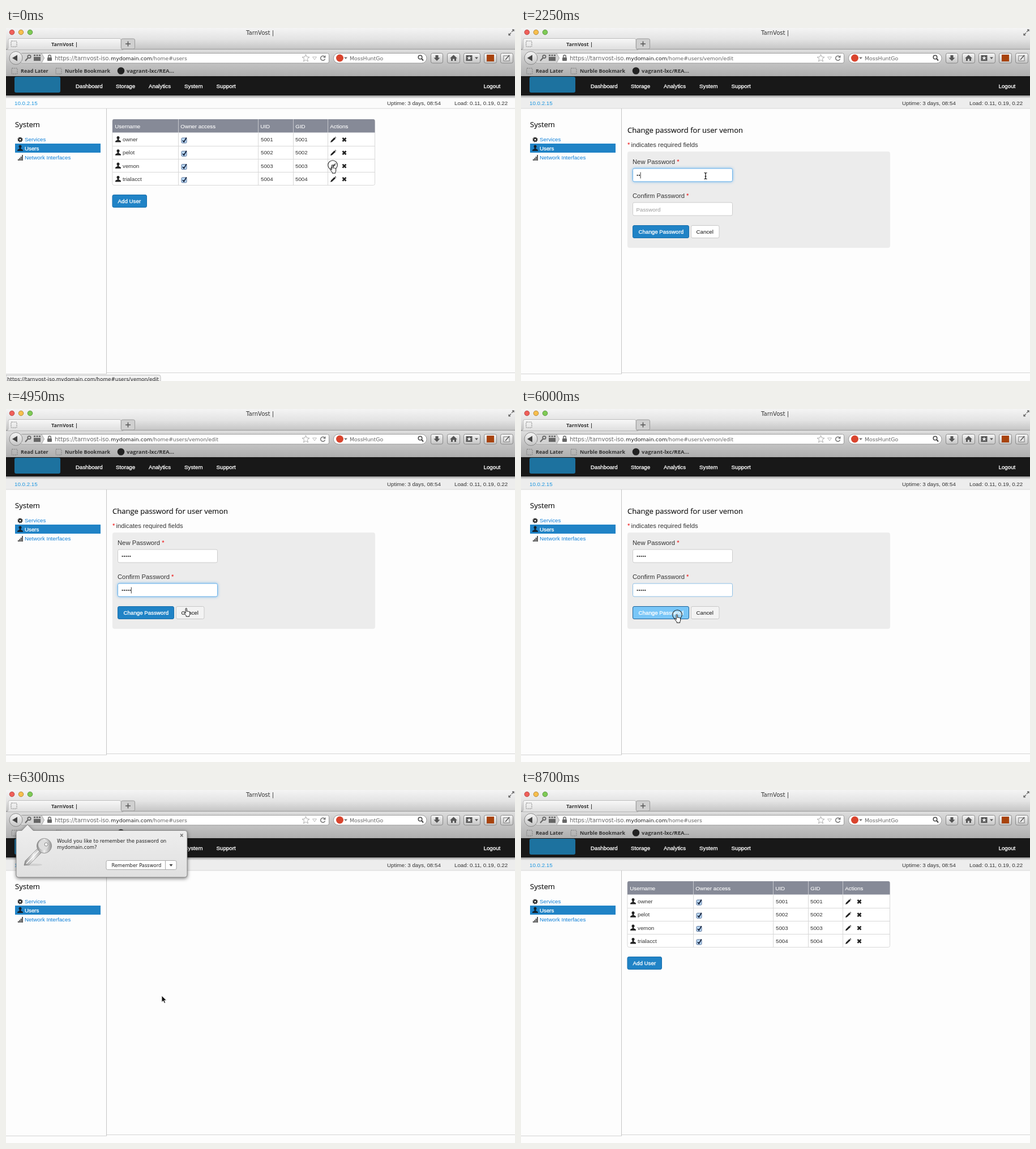
An HTML page that plays this animation: 899 px wide and 623 px high, repeating every 9430 ms.

```html
<!DOCTYPE html>
<html lang="en">
<head>
<meta charset="utf-8">
<title>TarnVost</title>
<style>
html, body { margin: 0; width: 100%; height: 100%; overflow: hidden; background: #fdfdfd; }
svg { display: block; }
text { font: 9.75px "Liberation Sans", Arial, sans-serif; fill: #333; white-space: pre; }
.ui { font-family: "DejaVu Sans", sans-serif; font-size: 9.4px; fill: #666; }
.mark { font: 700 9px "Open Sans", sans-serif; fill: #333; }
.head { font: 13px "Open Sans", sans-serif; fill: #111; stroke: #111; stroke-width: .15px; }
.big { font-size: 11.25px; }
.lit { fill: #fff; stroke: #fff; stroke-width: .3px; }
.th { fill: #fff; stroke: #fff; stroke-width: .1px; }
.link { fill: #0d7fd8; }
.req { fill: #e00; }
.hint { fill: #999; }
.btn { fill: url(#metal); stroke: #888; }
.field { fill: #fff; stroke: #ccc; }
.field.soft { stroke: #8dbfe6; }
.field.on { stroke: #6bb2ea; filter: drop-shadow(0 0 2.5px rgba(82,168,236,.75)); }
.blue { fill: #2083c6; stroke: #1a6fab; }
.blue.hover { fill: #75c5f7; stroke: #2b83bd; }
.blue.press { fill: #79c6f7; stroke: #1a6199; }
.plain { fill: #fff; stroke: #c8c8c8; }
.plain.hover { fill: #f3f3f3; }
</style>
</head>
<body>
<svg width="899" height="623" viewBox="0 0 899 623">
<defs>
  <linearGradient id="title" x2="0" y2="1"><stop stop-color="#f4f4f4"/><stop offset=".5" stop-color="#e4e4e4"/><stop offset="1" stop-color="#c2c2c2"/></linearGradient>
  <linearGradient id="bar" x2="0" y2="1"><stop stop-color="#dedede"/><stop offset=".5" stop-color="#c3c3c3"/><stop offset="1" stop-color="#afafaf"/></linearGradient>
  <linearGradient id="tab" x2="0" y2="1"><stop stop-color="#f8f8f8"/><stop offset="1" stop-color="#dedede"/></linearGradient>
  <linearGradient id="metal" x2="0" y2="1"><stop stop-color="#f6f6f6"/><stop offset="1" stop-color="#c4c4c4"/></linearGradient>
  <linearGradient id="note" x2="0" y2="1"><stop stop-color="#efefef"/><stop offset="1" stop-color="#e0e0e0"/></linearGradient>
  <linearGradient id="shade" x2="0" y2="1"><stop stop-color="#999"/><stop offset="1" stop-color="#eee"/></linearGradient>
  <linearGradient id="steel"><stop stop-color="#8a8a8a"/><stop offset=".5" stop-color="#eee"/><stop offset="1" stop-color="#999"/></linearGradient>
  <g id="person"><circle cy="-3" r="2.5"/><path d="M-1.3-1.5h2.6V1L4.5 2.7Q5 3 5 5H-5Q-5 3-4.5 2.7L-1.3 1z"/></g>
  <g id="pencil"><path d="M-5 5l1-3L2-4l2.2 2.2L-2 4z"/><path d="M2.8-4.7l.9-.6L5.2-3.6l-.5.9z"/></g>
  <path id="cross" d="M-3-3L3 3M3-3L-3 3" stroke="#222" stroke-width="2.7"/>
  <g id="check"><rect x="-4.5" y="-4" width="9" height="9" rx="1.5" fill="#b9d8f5" stroke="#566f95"/><path d="M-2.5.5L-.3 3 4.3-4.5" fill="none" stroke="#0b1730" stroke-width="1.7"/></g>
  <rect id="dashed" x="-5" y="-5" width="10" height="10" rx="1" fill="none" stroke="#777" stroke-dasharray="2 1.3"/>
</defs>

<!-- page -->
<rect width="899" height="623" fill="#fdfdfd"/>
<rect y="122" width="899" height="20" id="info"/>
<rect y="85" width="899" height="34" fill="#181818"/>
<rect y="119" width="899" height="5" fill="url(#shade)"/>
<path d="M0 142h899" stroke="#d8d8d8"/>
<path d="M177.5 142v468" stroke="#c4c4c4"/>
<path d="M0 610.5h178M178 608.5h721" stroke="#d4d4d4"/>
<rect x="15" y="86" width="81" height="28" rx="3" fill="#1d729f"/>
<g id="nav"></g>
<text x="15" y="136" style="fill:#1b95e0">10.0.2.15</text>
<text x="673" y="136">Uptime: 3 days, 08:54</text>
<text x="792" y="136">Load: 0.11, 0.19, 0.22</text>
<text class="head" x="16" y="175">System</text>
<rect x="16" y="204" width="151" height="16" fill="#2083c6"/>
<circle cx="25" cy="197" r="2.5" fill="none" stroke="#222" stroke-width="2"/>
<circle cx="25" cy="197" r="3.9" fill="none" stroke="#222" stroke-width="1.4" stroke-dasharray="1.6 1.46"/>
<use href="#person" x="25" y="212" fill="#12202c"/>
<path d="M21.8 234v-2.5M24.2 234v-4.5M26.6 234v-7M29 234v-10" stroke="#222" stroke-width="1.5"/>
<text class="link" x="33" y="200">Services</text>
<text class="lit" x="33" y="216">Users</text>
<text class="link" x="33" y="232">Network Interfaces</text>

<g id="list"></g>

<g id="form">
  <text class="head" x="188" y="184.5">Change password for user vemon</text>
  <text class="big" x="188" y="210"><tspan class="req">*</tspan></text>
  <text class="big" x="194.5" y="210">indicates required fields</text>
  <rect x="188" y="218" width="464" height="170" rx="4" fill="#ececec"/>
  <text class="big" x="197" y="240">New Password <tspan class="req">*</tspan></text>
  <text class="big" x="197" y="300">Confirm Password <tspan class="req">*</tspan></text>
  <g id="inputs"></g>
  <rect id="change" class="blue" x="197.5" y="348.5" width="99" height="22" rx="2.5"/>
  <text class="lit" x="207.5" y="363">Change Password</text>
  <rect id="cancel" class="plain" x="300.5" y="348.5" width="49.5" height="22" rx="2.5"/>
  <text x="309.5" y="363" style="fill:#111">Cancel</text>
</g>

<!-- browser frame -->
<rect width="899" height="39" fill="url(#title)"/>
<rect y="38" width="899" height="47" fill="url(#bar)"/>
<path d="M0 37.5h899" stroke="#999"/>
<path d="M203.5 37V21q0-2 3-2h18q3 0 3 2v14q0 2-3 2z" fill="#d0d0d0" stroke="#999"/>
<path d="M211 28h9M215.5 23.5v9" stroke="#555" stroke-width="1.5"/>
<path d="M0 38.5q4 0 4-4V21q0-2.5 3-2.5h193q3 0 3 2.5v13.5q0 4 4 4z" fill="url(#tab)" stroke="#aaa" stroke-width=".7"/>
<g stroke-width=".8"><circle cx="10.5" cy="7.5" r="4.3" fill="#f0605a" stroke="#a33"/><circle cx="26.5" cy="7.5" r="4.3" fill="#f7bf4d" stroke="#a5772a"/><circle cx="42.5" cy="7.5" r="4.3" fill="#7fcb55" stroke="#4a8431"/></g>
<text class="ui" x="424" y="11.5" style="font-size:10.1px;fill:#333">TarnVost |</text>
<text class="mark" x="80" y="31.5">TarnVost |</text>
<path d="M893 7l4-4m-3 0h3v3M892 8.5l-4 4m0-3v3h3" fill="none" stroke="#666" stroke-width="1.3"/>
<use href="#dashed" x="14" y="28"/><use href="#dashed" x="15" y="76"/><use href="#dashed" x="93" y="76"/>
<circle cx="203" cy="75.5" r="6.3" fill="#222"/>
<text class="mark" x="26" y="79">Read Later</text>
<text class="mark" x="104" y="79">Nurble Bookmark</text>
<text class="mark" x="213" y="79" style="font-size:9.6px">vagrant-lxc/REA...</text>
<rect x="26" y="44.5" width="544.5" height="17.5" rx="3" fill="#fff" stroke="#999"/>
<path d="M28 45h35l5 8-5 8.5H28z" fill="#d3d3d3"/>
<path d="M63 45l4.5 8-4.5 8.5" fill="none" stroke="#aaa"/>
<circle cx="17.5" cy="53" r="11.5" class="btn"/>
<path d="M11 53l9-5.5v11z" fill="#444"/>
<circle cx="41" cy="50.5" r="2.7" fill="none" stroke="#666" stroke-width="1.8"/><path d="M39 52.5l-5 5.5" stroke="#666" stroke-width="2"/>
<path d="M49 51h12v7H49zM49 47h3v2.5h-3zm4.5 0h3v2.5h-3zm4.5 0h3v2.5h-3z" fill="#666"/>
<rect x="73" y="52" width="8" height="6" rx="1" fill="#666"/><path d="M74.7 52v-2a2.3 2.3 0 0 1 4.6 0v2" fill="none" stroke="#666" stroke-width="1.4"/>
<text class="ui" x="86" y="57" style="font-size:10.05px">https://tarnvost-iso.</text>
<text class="ui" x="185" y="57" style="fill:#222">mydomain.com</text>
<text class="ui" id="path" x="258" y="57" style="font-size:9.2px"></text>
<path d="M529.5 46.5l1.8 4.5 4.7.3-3.7 3 1.2 4.7-4-2.6-4 2.6 1.2-4.7-3.7-3 4.7-.3z" fill="#fff" stroke="#aaa"/>
<path d="M541.5 51h7l-3.5 5z" fill="#fff" stroke="#bbb"/>
<path d="M563 51a4 4 0 1 0 .5 3.5" fill="none" stroke="#777" stroke-width="1.5"/><path d="M564.5 48v4.5H560z" fill="#777"/>
<rect x="578.5" y="44.5" width="164.5" height="17.5" rx="8.7" fill="#fff" stroke="#999"/>
<circle cx="589.5" cy="53" r="6.5" fill="#d9442e"/>
<path d="M597 51.5h6l-3 3.5z" fill="#777"/>
<text class="ui" x="607" y="57">MossHuntGo</text>
<circle cx="731.5" cy="51.5" r="3.3" fill="none" stroke="#444" stroke-width="1.5"/><path d="M734 54l3 3.5" stroke="#444" stroke-width="2"/>
<g id="tools"></g>
<path d="M758.5 48h5v4.5h3l-5.5 5.5-5.5-5.5h3zM784 53.5l6.5-6 6.5 6h-2v4.5h-3v-3.5h-3v3.5h-3v-4.5z" fill="#555"/>
<rect x="812.5" y="48" width="11" height="10" fill="#555"/><path d="M818 49l1 2.8h3l-2.4 1.8.9 3-2.5-1.8-2.5 1.8.9-3-2.4-1.8h3z" fill="#eee"/><path d="M828 51.5h6l-3 3.5z" fill="#555"/>
<rect x="849" y="47" width="13" height="12" fill="#a8430d"/>
<rect x="879" y="49" width="10" height="9" fill="#eee" stroke="#777"/><path d="M882 56l7-8" stroke="#555" stroke-width="1.5"/>

<g id="status">
  <path d="M0 612.5h270q3 0 3 3V623H0z" fill="#f2f2f2" stroke="#bbb"/>
  <text class="ui" x="2" y="622.5" style="font-size:8.86px;fill:#222">https://tarnvost-iso.mydomain.com/home#users/vemon/edit</text>
</g>

<g id="popup">
  <path d="M22 71.5h6l10-10.5 10 10.5h268q4 0 4 4v74.5q0 4-4 4H22q-4 0-4-4V75.5q0-4 4-4z" fill="url(#note)" stroke="#777" stroke-width=".8" style="filter:drop-shadow(0 2px 3px rgba(0,0,0,.5))"/>
  <ellipse cx="48" cy="132" rx="16" ry="2" fill="#d0d0d0"/>
  <path d="M58 101l7 7-24 24-9 1 2-8z" fill="url(#steel)" stroke="#777" stroke-width=".7"/>
  <path d="M60 105L36 130" stroke="#fff" stroke-width="1.5"/>
  <circle cx="67.5" cy="98.5" r="13" fill="url(#steel)" stroke="#8a8a8a"/>
  <circle cx="66" cy="97" r="9" fill="#ddd"/>
  <circle cx="71" cy="96" r="3" fill="#f8f8f8" stroke="#888"/>
  <text class="ui" x="90" y="93" style="font-size:8.5px;fill:#222">Would you like to remember the password on</text>
  <text class="ui" x="90" y="104" style="font-size:8.5px;fill:#222">mydomain.com?</text>
  <rect x="177" y="124.5" width="124" height="16" rx="2.5" fill="#fff" stroke="#aaa"/>
  <path d="M281.5 125v15.5" stroke="#aaa"/><path d="M288.5 131h6l-3 4z" fill="#444"/>
  <text class="ui" x="186.5" y="136" style="font-size:8.4px;fill:#222">Remember Password</text>
  <rect id="closeHover" x="305.5" y="75" width="10" height="10" rx="1" fill="#999"/>
  <path id="closeMark" d="M308 77.5l4.5 5m0-5l-4.5 5" stroke="#777" stroke-width="1.5"/>
</g>

<g id="cursor">
  <circle id="ring" cx="1" r="8.3" fill="rgba(255,255,255,.25)" stroke="#222" stroke-width="1.1"/>
  <path id="arrow" d="M0 0v11.5l2.7-2.5 1.9 4.3 2-.9-1.9-4.1h3.8z" fill="#111" stroke="#fff" stroke-width=".8"/>
  <path id="beam" d="M-2.5-5.5Q0-5.5 0-4 0-5.5 2.5-5.5M0-4.5v9M-2.5 5.5Q0 5.5 0 4 0 5.5 2.5 5.5M-1.3.8h2.6" fill="none" stroke="#111" stroke-width="1.2"/>
  <path id="hand" d="M-.8 7.5V.8q0-1.2 1.1-1.2T1.4.8v4.5q1-1 2 0 1-.7 1.8.4 1.5-.5 1.5 1.2v3q0 1.5-1 2.6v1.7H.2v-1.6L-3.3 8.5q-.6-1.3.5-1.6 1-.1 2 1.7z" fill="#fff" stroke="#111"/>
</g>
</svg>
<script>
const $ = id => document.getElementById(id);
const show = (id, on) => $(id).style.display = on ? '' : 'none';
const label = (x, y, s, cls = '') => `<text class="${cls}" x="${x}" y="${y}">${s}</text>`;

$('nav').innerHTML = [[123, 'Dashboard'], [194, 'Storage'], [252, 'Analytics'], [315, 'System'],
  [371.5, 'Support'], [843.5, 'Logout']].map(([x, s]) => label(x, 106, s, 'lit')).join('');

$('tools').innerHTML = [[750.5, 21], [779.5, 22], [808.5, 29], [844.5, 22], [873.5, 22]]
  .map(([x, w]) => `<rect class="btn" x="${x}" y="44.5" width="${w}" height="17.5" rx="3"/>`).join('');

const columns = [[188, 'Username'], [304, 'Owner access'], [445, 'UID'], [507, 'GID'], [568, 'Actions']];
const users = ['owner', 'pelot', 'vemon', 'trialacct'];
const rowHeight = 23.3;
$('list').innerHTML = `<rect x="188" y="161.5" width="463.5" height="116" rx="3" fill="#fff" stroke="#d8d8d8"/>
  <path d="M188 184.5V164q0-3 3-3h457.5q3 0 3 3v20.5z" fill="#868a97"/>` +
  columns.map(([x, s], i) => label(x + 4.3, 176.5, s, 'th') +
    (i ? `<path d="M${x + .5} 161v23" stroke="#c4c6cc"/><path d="M${x + .5} 184v93" stroke="#d8d8d8"/>` : '')).join('') +
  users.map((name, i) => {
    const y = 196.5 + i * rowHeight, id = 5001 + i;
    return (i ? `<path d="M188 ${Math.round(y - 12) + .5}h463.5" stroke="#d8d8d8"/>` : '') +
      `<use href="#person" x="198" y="${y}" fill="#222"/><use href="#check" x="314.5" y="${y + 1.5}"/>` +
      `<use href="#pencil" x="578" y="${y + .5}" fill="#222"/><use href="#cross" x="597.5" y="${y + .5}"/>` +
      label(206, y + 3.5, name) + label(450, y + 3.5, id) + label(511, y + 3.5, id);
  }).join('') +
  `<rect class="blue" x="188" y="294.5" width="60.5" height="22" rx="2.5"/>` + label(197.5, 309, 'Add User', 'lit');

// Each step overrides the state before it; at = [cursor shape, x, y].
const steps = [
  [0, { page: 'list', edit: 0, status: 1, at: ['hand', 576, 242], ring: 1, dots: [0, 0], focus: ['', ''], caret: -1, change: '', cancel: '', popup: 0, close: 0 }],
  [450, { page: '', edit: 1, status: 0, ring: 0, at: ['arrow', 576, 242] }],
  [600, { page: 'form' }],
  [1050, { at: ['arrow', 410, 274] }],
  [1200, { at: ['beam', 328, 270] }],
  [1350, { at: ['beam', 326, 263] }],
  [1500, { at: ['beam', 326, 261] }],
  [1650, { ring: 1, focus: ['soft', ''], caret: 0 }],
  [1800, { ring: 0, focus: ['on', ''] }],
  [2250, { dots: [2, 0] }],
  [2550, { dots: [4, 0] }],
  [2850, { dots: [5, 0] }],
  [3150, { focus: ['soft', 'soft'], caret: 1 }],
  [3300, { focus: ['', 'on'] }],
  [3750, { dots: [5, 1] }],
  [3900, { dots: [5, 2] }],
  [4050, { dots: [5, 4] }],
  [4350, { dots: [5, 5] }],
  [4650, { at: ['beam', 326, 268] }],
  [4800, { at: ['beam', 324, 299] }],
  [4950, { at: ['hand', 318, 352], cancel: 'hover' }],
  [5100, { at: ['hand', 303, 367] }],
  [5250, { at: ['hand', 286, 368], change: 'hover', cancel: '' }],
  [5400, { at: ['hand', 278, 365] }],
  [5550, { at: ['hand', 275, 363] }],
  [6000, { ring: 1, change: 'press', cancel: 'hover', focus: ['', 'soft'], caret: -1 }],
  [6150, { ring: 0, change: 'hover', focus: ['', ''] }],
  [6300, { page: '', edit: 0, popup: 1, at: ['arrow', 275, 363] }],
  [6450, { page: 'list' }],
  [6900, { at: ['arrow', 273, 352] }],
  [7050, { at: ['arrow', 268, 305] }],
  [7200, { at: ['arrow', 272, 226] }],
  [7350, { at: ['arrow', 286, 148] }],
  [7500, { at: ['arrow', 303, 99] }],
  [7650, { at: ['arrow', 310, 83] }],
  [7800, { at: ['arrow', 311, 80], close: 1 }],
  [8250, { ring: 1 }],
  [8400, { ring: 0, popup: 0 }],
  [8550, { at: ['arrow', 795, 581] }],
  [8700, { at: ['none', 0, 0] }]
];
const loop = 9430;
let state = {};
const timeline = steps.map(([time, change]) => [time, state = { ...state, ...change }]);

function inputs({ dots, focus, caret }) {
  return dots.map((count, i) => {
    const y = 259.5 + i * 60;
    const marks = Array.from({ length: count }, (_, k) => `<circle cx="${205.6 + k * 3.4}" cy="${y + .5}" r="1.15" fill="#333"/>`).join('');
    return `<rect class="field ${focus[i]}" x="197.5" y="${y - 11.5}" width="176" height="23" rx="2.5"/>` +
      (count ? marks : label(203.5, y + 4, 'Password', 'hint')) +
      (caret === i ? `<path d="M${204.3 + count * 3.4} ${y - 5}v11" stroke="#222" stroke-width=".9"/>` : '');
  }).join('');
}

function draw(s) {
  show('list', s.page === 'list');
  show('form', s.page === 'form');
  show('status', s.status);
  show('popup', s.popup);
  show('closeHover', s.close);
  $('closeMark').setAttribute('stroke', s.close ? '#eee' : '#777');
  $('info').setAttribute('fill', s.status ? '#fbfbfb' : '#ededed');
  $('path').textContent = '/home#users' + (s.edit ? '/vemon/edit' : '');
  $('inputs').innerHTML = inputs(s);
  $('change').setAttribute('class', 'blue ' + s.change);
  $('cancel').setAttribute('class', 'plain ' + s.cancel);
  const [shape, x, y] = s.at;
  ['arrow', 'beam', 'hand'].forEach(id => show(id, id === shape));
  show('ring', s.ring);
  $('cursor').setAttribute('transform', `translate(${x} ${y})`);
}

let shown;
const start = performance.now();
function tick() {
  const t = (performance.now() - start) % loop;
  const current = timeline.findLast(([time]) => time <= t)[1];
  if (current !== shown) draw(shown = current);
  requestAnimationFrame(tick);
}
tick();
</script>
</body>
</html>
```
